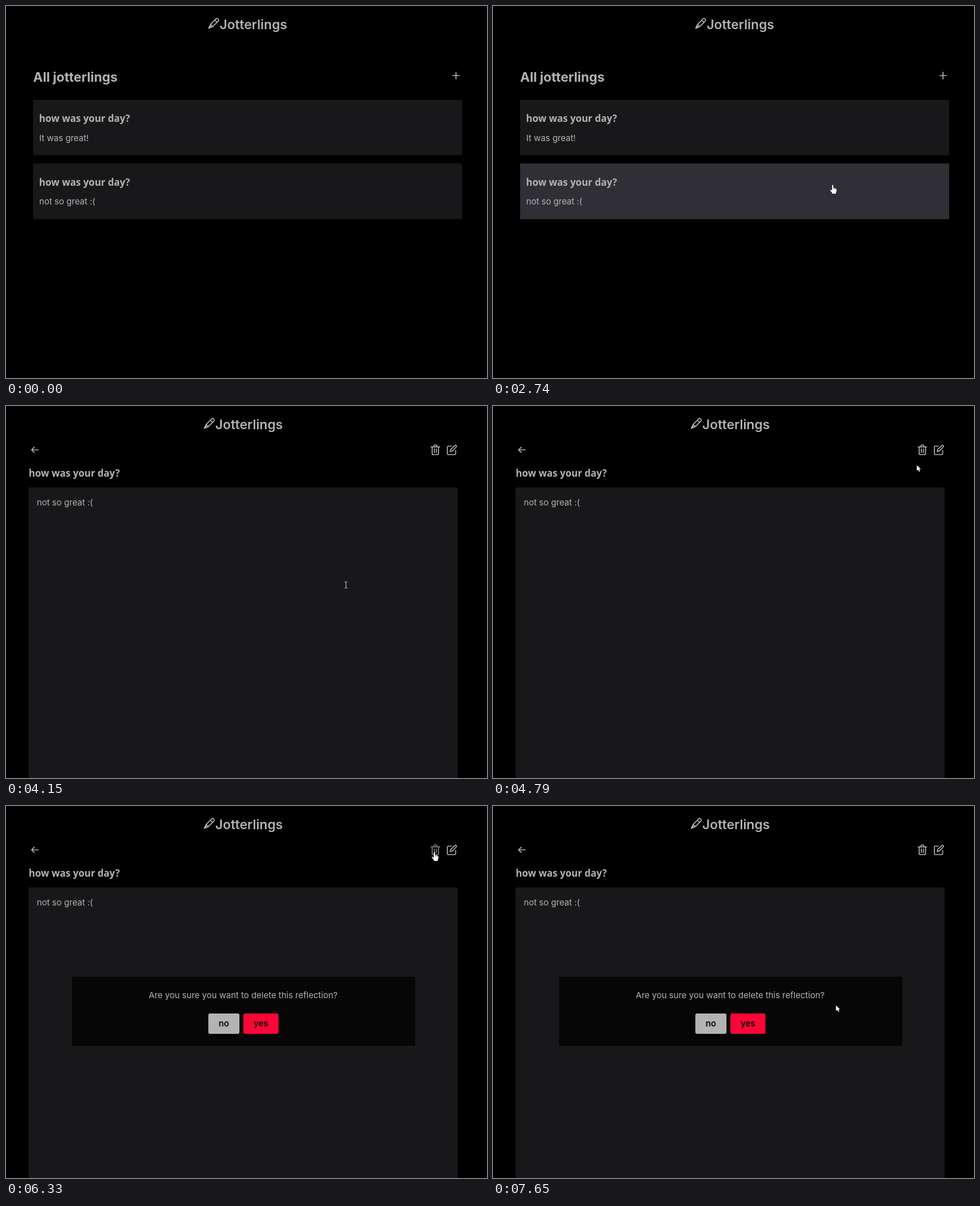
Animation of 851x658 px, one loop 7990 ms. Source, as an HTML page:

```html
<!DOCTYPE html>
<html lang="en">
<head>
<meta charset="utf-8">
<title>Jotterlings</title>
<style>
  html, body { margin: 0; width: 100%; height: 100%; overflow: hidden; background: #000; }
  svg { display: block; width: 851px; height: 658px; }
  text { font: 15.05px Inter, sans-serif; fill: #b3b3b3; }
  .title { font-size: 23px; font-weight: 600; }
  .heading { font-size: 23px; font-weight: 700; }
  .question { font: 700 17.05px "Noto Sans", "Open Sans", sans-serif; }
  .button { font-size: 15px; font-weight: 600; fill: #050505; text-anchor: middle; }
  .icon { fill: none; stroke: #b3b3b3; stroke-width: 1.7; stroke-linecap: round; stroke-linejoin: round; }
  .panel { fill: #18181a; }
  .off { display: none; }
</style>
</head>
<body>
<svg viewBox="0 0 851 658">
  <defs>
    <g id="brand">
      <g class="icon">
        <path d="M361.8 32.6 371.6 22.6Q373 21.2 374.5 22.6L375.6 23.7Q377 25.1 375.6 26.6L365.8 36.4 358.8 39.2ZM369.3 25 373.2 28.9M361.8 32.6 365.8 36.4"/>
        <path d="M360.6 35.3 362.9 37.6 358.8 39.2Z" fill="#b3b3b3"/>
      </g>
      <text class="title" x="378" y="41">Jotterlings</text>
    </g>
  </defs>

  <g id="list">
    <use href="#brand"/>
    <text class="heading" x="48" y="134">All jotterlings</text>
    <path class="icon" d="M790.5 123H802M796.2 117.2V128.8"/>
    <rect class="panel" x="48" y="166" width="759" height="98"/>
    <text class="question" x="58.5" y="205">how was your day?</text>
    <text x="58.8" y="239">It was great!</text>
    <rect id="card" x="48" y="278.5" width="759" height="98.5"/>
    <text class="question" x="58.5" y="318">how was your day?</text>
    <text x="58.8" y="351">not so great :(</text>
  </g>

  <g id="detail">
    <use href="#brand" x="-7.7"/>
    <path class="icon" d="M57 77.5H45.5M50 72.8 45.3 77.5 50 82.2"/>
    <path id="trash" class="icon" d="M752 72.3H767.3M754 72.3V84Q754 86 756 86H763.3Q765.3 86 765.3 84V72.3M757 72V70.5Q757 69 758.5 69H760.8Q762.3 69 762.3 70.5V72M757.8 76.2V82.2M761.5 76.2V82.2"/>
    <path class="icon" d="M788 71H782.5Q781 71 781 72.5V84.5Q781 86 782.5 86H794Q795.5 86 795.5 84.5V78.5M794 69.8Q795.3 68.8 796.5 70T796.6 72.5L789.2 79.8 785.8 80.7 786.7 77.2Z"/>
    <text class="question" x="40.3" y="125">how was your day?</text>
    <path class="panel" d="M40 658V146Q40 144 42 144H797Q799 144 799 146V658Z"/>
    <text x="54.5" y="176">not so great :(</text>
    <g id="dialog">
      <rect x="117" y="302" width="607" height="122" fill="#060606"/>
      <text x="252.5" y="339.5">Are you sure you want to delete this reflection?</text>
      <rect x="358" y="367" width="55" height="36" rx="3" fill="#b3b3b3"/>
      <text class="button" x="385.5" y="390">no</text>
      <rect x="420" y="367" width="62" height="36" rx="3" fill="#fc0638"/>
      <text class="button" x="451" y="390">yes</text>
    </g>
  </g>

  <g id="pointer">
    <path id="arrow" d="M.8 .8V10.6L3.2 8.6 5 12.2 6.6 11.5 4.9 8H8Z" fill="#fff"/>
    <g id="hand" stroke="#111" stroke-width=".8">
      <path fill="#fff" d="M-1.6 1.6Q-1.6 0 0 0T1.5 1.6V5.5Q3.1 4.8 3.7 6 5.1 5.5 5.7 6.7 7.3 6.4 7.3 8.2V11Q7.2 13 6 14.6V16.6H-1.2V15Q-4 11.6-5 9.6-4.9 7.6-3.2 8.4L-1.6 10Z"/>
      <path fill="none" stroke-width=".5" d="M1.5 5.5V8.5M3.7 6V8.7M5.7 6.7V9"/>
    </g>
    <path id="beam" d="M-2.5-5.5H-.5L0-5 .5-5.5H2.5M0-5V5M-2.5 5.5H-.5L0 5 .5 5.5H2.5" fill="none" stroke="#c8c8c8"/>
  </g>
</svg>
<script>
  const LOOP = 7990, ENTER = 790, OPEN = 2950, CONFIRM = 6330;
  const el = id => document.getElementById(id);
  const show = (id, on) => el(id).classList.toggle('off', !on);
  const clamp = v => Math.min(1, Math.max(0, v));
  const smooth = u => u * u * (3 - 2 * u);
  const glide = u => 1 - (1 - u) ** 2.39;
  const swoop = u => glide(u) ** 1.8;
  const mix = (a, b, p) => a + (b - a) * p;

  // start, end, x, y, easing for x, easing for y
  const moves = [
    [ENTER, 1600, 593, 306, glide, swoop],
    [2430, 2430, 602, 310],
    [2650, 2740, 601, 316],
    [4150, 4800, 749, 104],
    [4980, 5070, 748, 101],
    [5340, 5510, 751, 70],
    [6120, 6120, 756, 74],
    [CONFIRM, CONFIRM, 758, 81],
    [6840, 7620, 607, 352],
    [7650, 7650, 606, 352]
  ];

  function pointerAt(t) {
    let x = 850, y = 450;
    for (const [start, end, toX, toY, easeX = smooth, easeY = easeX] of moves) {
      if (t < start) break;
      const u = t >= end ? 1 : (t - start) / (end - start);
      x = mix(x, toX, easeX(u));
      y = mix(y, toY, easeY(u));
    }
    return [Math.round(x), Math.round(y)];
  }

  function render(t) {
    const detail = t >= OPEN, dialog = t >= CONFIRM;
    const [x, y] = pointerAt(t);
    const overTrash = detail && x >= 750 && y < 90;
    const overCard = !detail && y < 377;
    const overText = detail && y > 144 && !(dialog && y > 302 && x < 724);
    const shape = overTrash || overCard ? 'hand' : overText ? 'beam' : 'arrow';

    show('list', !detail);
    show('detail', detail);
    show('dialog', dialog);
    show('pointer', t >= ENTER);
    for (const id of ['arrow', 'hand', 'beam']) show(id, id === shape);

    const half = shape === 'beam' ? 0.5 : 0;
    el('pointer').setAttribute('transform', `translate(${x + half} ${y + half})`);
    el('trash').style.stroke = overTrash ? '#808080' : '';

    const hover = clamp((t - 1115) / 545);
    const grey = mix(24, 47, hover);
    el('card').style.fill = `rgb(${grey}, ${grey}, ${mix(26, 53, hover)})`;
  }

  const begin = performance.now();
  function tick() {
    render((performance.now() - begin) % LOOP);
    requestAnimationFrame(tick);
  }
  tick();
</script>
</body>
</html>
```
